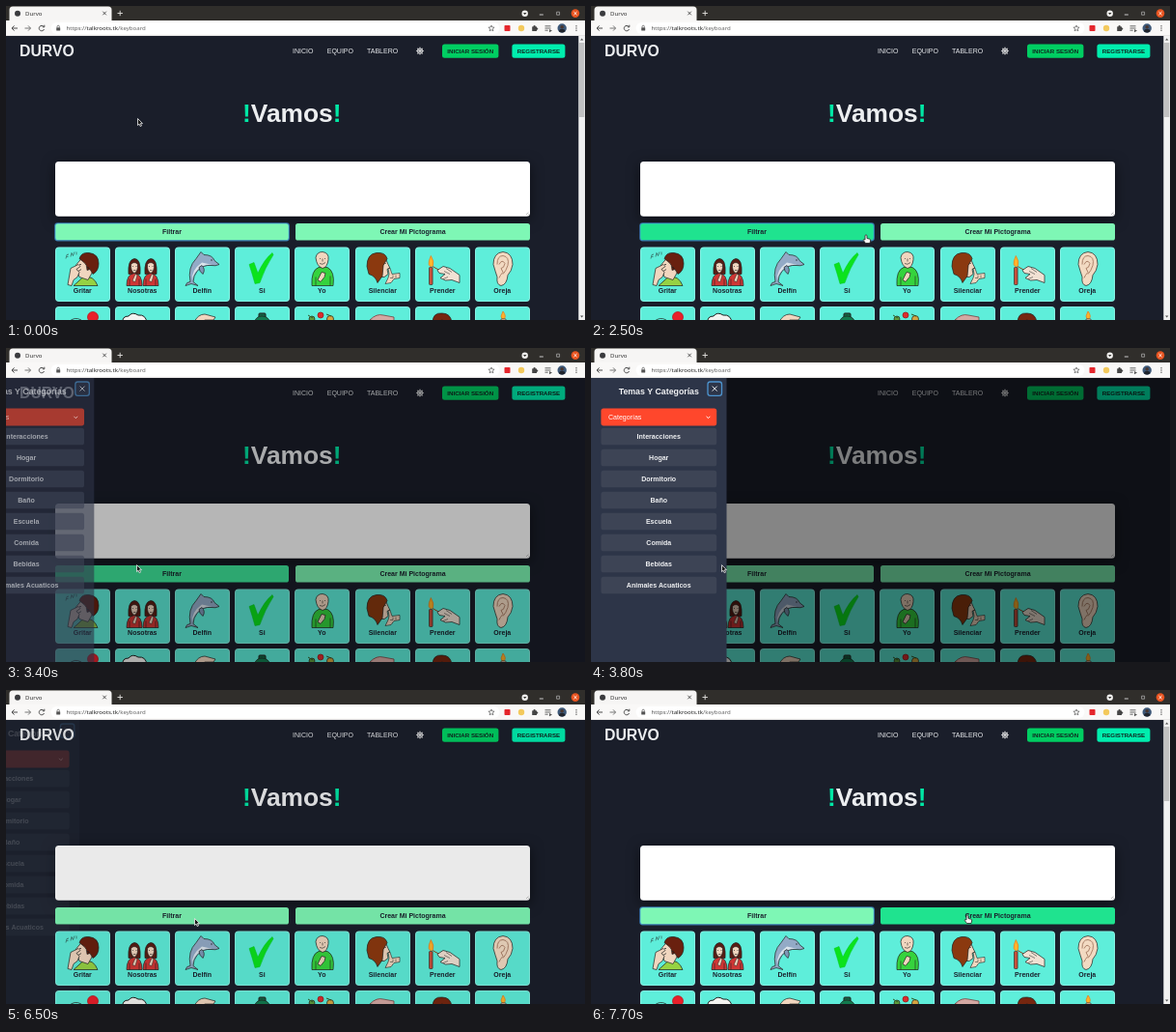
Write an HTML page with a canvas that moves like this. It is 600 px wide and 325 px high and loops after 8000 ms.

```html
<!DOCTYPE html>
<html lang="es">
<head>
<meta charset="utf-8">
<title>Durvo</title>
<style>
html, body { margin: 0; width: 100%; height: 100%; overflow: hidden; background: #1a1e2a; }
canvas { display: block; width: 600px; height: 325px; }
</style>
</head>
<body>
<canvas id="stage"></canvas>
<script>
const canvas = document.getElementById('stage');
const ctx = canvas.getContext('2d');
const W = 600, H = 325, TOP = 31, LOOP = 8000, STEP = 100;
const dpr = window.devicePixelRatio || 1;
canvas.width = W * dpr;
canvas.height = H * dpr;

const BRAND = 'Durvo';
const SANS = '"Liberation Sans", Arial, sans-serif', UI = '"Noto Sans", sans-serif';
const SKIN = '#f1d6bf', PALE = '#f1e1d3', INK = '#20201f', PAGE = '#1a1e2a';
const GREENS = [[126, 247, 181], [31, 227, 143], [5, 202, 124]];
const CARDS = ['Gritar', 'Nosotras', 'Delfín', 'Si', 'Yo', 'Silenciar', 'Prender', 'Oreja'];
const TOPICS = ['Interacciones', 'Hogar', 'Dormitorio', 'Baño', 'Escuela', 'Comida', 'Bebidas', 'Animales Acuaticos'];

// Tracks are [time, value...] keys, read with linear interpolation.
const POINTER = [
  [0, 136.5, 116.5], [1400, 136.5, 116.5], [1500, 138, 128], [1800, 262, 200],
  [2000, 365, 229], [2150, 375, 231], [2300, 341, 221], [2500, 285, 237],
  [2800, 190, 236], [3000, 145, 231], [3200, 135.5, 224.6], [4000, 135.5, 224.6],
  [4200, 141, 232], [4400, 118, 190], [4700, 92, 110], [4900, 84, 72],
  [5000, 82, 69], [5300, 98, 125], [5600, 112, 210], [5800, 148, 230],
  [6100, 195.5, 236.5], [7100, 195.5, 236.5], [7200, 206, 238], [7400, 315, 239], [7600, 390, 233]
];
const FILTER_HEAT = [[2300, 0], [2500, 1], [3100, 1], [3200, 2], [3500, 0], [6600, 0], [6800, 1], [7200, 1], [7400, 0]];
const CREATE_HEAT = [[1900, 0], [2000, 1], [2200, 1], [2300, 0], [7300, 0], [7500, 1]];
const SLIDE = [[3200, 0], [3300, .3], [3400, .65], [3500, .88], [3600, .97], [3700, 1], [6200, 1], [6300, .92], [6500, .54], [6700, .2]];
const FADE = [[3200, 0], [3300, .25], [3400, .6], [3500, .85], [3700, 1], [6200, 1], [6300, .8], [6400, .45], [6500, .17], [6600, 0]];

function track(keys, t) {
  const next = keys.findIndex(k => k[0] > t);
  if (next === 0) return keys[0].slice(1);
  if (next < 0) return keys[keys.length - 1].slice(1);
  const a = keys[next - 1], b = keys[next], u = (t - a[0]) / (b[0] - a[0]);
  return a.slice(1).map((v, i) => v + (b[i + 1] - v) * u);
}

function greenAt(heat) {
  const i = Math.min(1, Math.floor(heat)), u = heat - i;
  return `rgb(${GREENS[i].map((v, k) => Math.round(v + (GREENS[i + 1][k] - v) * u))})`;
}

function box(x, y, w, h, r, fill, stroke, line = 1) {
  ctx.beginPath();
  ctx.roundRect(x, y, w, h, r);
  if (fill) { ctx.fillStyle = fill; ctx.fill(); }
  if (stroke) { ctx.strokeStyle = stroke; ctx.lineWidth = line; ctx.stroke(); }
}

function dot(x, y, r, fill, stroke, line = .7) {
  box(x - r, y - r, 2 * r, 2 * r, r, fill, stroke, line);
}

function shape(d, fill, stroke = INK, line = .7) {
  const path = new Path2D(d);
  if (fill) { ctx.fillStyle = fill; ctx.fill(path); }
  if (stroke) { ctx.strokeStyle = stroke; ctx.lineWidth = line; ctx.stroke(path); }
}

function text(str, x, y, size, color, { bold = false, align = 'left', family = SANS } = {}) {
  ctx.font = `${bold ? 'bold ' : ''}${size}px ${family}`;
  ctx.textAlign = align;
  ctx.fillStyle = color;
  ctx.fillText(str, x, y);
  return ctx.measureText(str).width;
}

function at(x, y, draw) {
  ctx.save();
  ctx.translate(x, y);
  draw();
  ctx.restore();
}

function girl(x) {
  at(x, 0, () => {
    shape('M2 28Q1 13 8 12Q15 12 14 28Z', '#5a1d14');
    shape('M0 40Q0 28 8 27Q16 28 16 40Z', '#d03634');
    shape('M4.5 18Q8 14 11.5 18Q12 25 8 27Q4 25 4.5 18Z', SKIN);
    shape('M6 35L9 28L11 29L9 36Z', SKIN, INK, .5);
    shape('M6 20h1M9.5 20h1M7 24h2.5M3 33v7M13 33v7', null, INK, .6);
  });
}

const PICTOGRAMS = [
  () => {
    shape('M19 40L29 31Q40 29 44 40Z', '#96d243');
    shape('M28 11L22 18L20 22L23 24L25 31L34 34L39 25L38 12Z', SKIN);
    shape('M25 12Q27 5 35 6Q45 7 45 17Q45 25 39 28L36 23L33 24Q33 18 30 16Z', '#69200f');
    shape('M16 22L24 18L26 20L22 23L25 26L23 31L19 34L17 40L13 39Z', SKIN);
    shape('M25 18h2M24 25l3 -2M33 21q2 -1 2 2', null);
    shape('M11 12l1 -4l2 -.5M12 10h1.5M16 10l1 -4l1.5 3l1.5 -4M22 8v-3', null, INK, .5);
  },
  () => { girl(12); girl(29); },
  () => {
    shape('M16 36Q13 21 22 12L27 5L30 8Q39 8 41 14L46 18Q42 20 38 19Q29 18 23 25Q19 30 19 36L24 40L17 38L11 40Q12 36 16 36Z', '#93aac6');
    shape('M39 18.5Q29 17 23 24Q19 28 18 34Q17 24 28 16Z', '#dbe4ec', null);
    shape('M28 19Q32 23 29 28Q25 25 25 21Z', '#7f98b8');
    dot(38, 13.5, .7, INK);
  },
  () => shape('M15 18L20 16L24 27Q31 12 39 6L40 8Q31 22 26 37L21 38Q18 27 15 18Z', '#0be31c', '#00c91b', .5),
  () => {
    shape('M18 40Q17 24 25 21L34 21Q42 25 40 40Z', '#35d33d');
    shape('M22 11Q23 5 29 5Q36 6 35 13Q34 21 29 22Q23 20 22 11Z', SKIN);
    shape('M24 34L28 26L32 27L31 31L27 36Z', SKIN);
    shape('M26 12h1M31 12h1M26 17Q29 19 32 16M29 12v3M22 31v9M37 30v10', null, INK, .6);
  },
  () => {
    shape('M31 11L34 18L36 22L33 23L34 28L30 31L25 31Z', SKIN);
    shape('M12 20Q12 7 22 6Q31 5 33 12L29 19L28 30L23 37Q21 30 14 28Z', '#8b390f');
    shape('M35 28L34 22L36 22L38 28L46 27L46 32L40 33L37 37L31 38L34 32Z', SKIN, INK, .6);
    shape('M30 17h2M36 32h3M39 29v3M42 29v3', null, INK, .5);
  },
  () => {
    box(14.5, 21, 3.6, 18, .8, '#c9503b', INK, .6);
    shape('M16.3 9Q20 15 18.5 19Q16 22 14.2 18Q13.5 15 16.3 9Z', '#ffb32a', '#e8791a');
    shape('M18 20L27 25', null, '#8c4f26', 1);
    shape('M23 24L29 20L36 22L46 29L46 37L38 34Q31 36 26 32L31 28L25 27Z', PALE);
    shape('M30 25L36 28M29 33L34 31M32 22L38 26', null, INK, .5);
  },
  () => {
    shape('M19 18Q19 6 29 5Q39 6 39 18Q38 25 34 29Q33 39 27 40Q22 39 23 31Q21 25 19 18Z', '#f2dac2');
    shape('M23 18Q23 9 29 9Q36 10 34 19Q32 25 29 28M25 18Q28 12 31 17Q30 22 27 22L29 26Q26 29 25 32', null, '#9b6c55', .8);
  }
];

const LOWER_ROW = [
  () => { dot(39, 11, 5.5, '#e8202a', '#b3121a'); shape('M14 16Q20 10 27 14', null, INK, .7); },
  () => shape('M8 17Q7 10 14 10Q18 5 24 9Q32 8 33 17Z', '#f3f3f0', INK, 1),
  () => shape('M20 16Q24 8 31 8L42 11L40 14L31 14L27 17Z', SKIN),
  () => { box(25, 7, 7, 5, 1, '#146444', INK); shape('M20 17Q22 10 28 10Q35 10 37 17Z', '#127a4e'); },
  () => {
    dot(27, 9, 3, '#dd2c2c', '#8f1717');
    dot(18, 13, 3, '#5f9d3d', INK);
    dot(37, 13, 3.5, '#d6a541', INK);
    shape('M14 9l5 3M22 15h9M33 8l5 2', null, '#305b28', 1);
  },
  () => shape('M15 14Q22 7 29 9L40 11L40 15L27 16Z', '#d4a9a3', '#6e3333'),
  () => { shape('M18 17Q18 6 28 7Q37 7 38 17Z', '#76260f'); shape('M24 17Q27 11 33 17Z', SKIN); },
  () => { shape('M29 5Q33 10 30 13Q27 13 27 10Z', '#ffb32a', '#e8791a'); box(27, 13, 5, 6, 0, '#f4d9bf', INK, .6); }
];

function drawCards() {
  CARDS.forEach((name, i) => {
    const x = Math.round(51 + i * 62.1);
    [249.5, 311].forEach((y, row) => at(x, y, () => {
      box(0, 0, 57, 56.5, 4, '#8ff5e7');
      box(.8, .8, 55.4, 54.9, 3.4, '#5eeeda');
      (row ? LOWER_ROW : PICTOGRAMS)[i]();
      if (!row) text(name, 28.3, 47.5, 7.03, '#1a202c', { bold: true, align: 'center' });
    }));
  });
}

function drawGear(x, y) {
  at(x, y, () => {
    for (let i = 0; i < 8; i++) {
      ctx.rotate(Math.PI / 4);
      box(-.35, -4, .7, 4, 0, '#eee');
    }
    dot(0, 0, 2.7, null, '#eee', .8);
  });
}

function drawHeader() {
  text(BRAND.toUpperCase(), 14, 52, 15.8, '#ebedf0', { bold: true });
  [['INICIO', 297], ['EQUIPO', 332.7], ['TABLERO', 374]].forEach(([label, x]) => text(label, x, 48.8, 7.03, '#e6e8eb'));
  drawGear(429, 46.6);
  box(452, 39.4, 58.4, 14.4, 2.5, '#00ce62');
  box(524.4, 39.4, 55, 14.4, 2.5, '#00eeae');
  text('INICIAR SESIÓN', 481.2, 48.8, 6.15, '#10251f', { bold: true, align: 'center' });
  text('REGISTRARSE', 552, 48.8, 6.15, '#10251f', { bold: true, align: 'center' });
}

function drawTitle() {
  const opt = { bold: true };
  let x = 245;
  [['!', '#00e7a5'], ['Vamos', '#eceef0'], ['!', '#00e7a5']].forEach(([s, c]) => { x += text(s, x, 120, 26.35, c, opt); });
}

function drawPage(t, locked) {
  ctx.fillStyle = PAGE;
  ctx.fillRect(0, TOP, W, H - TOP);
  drawHeader();
  drawTitle();
  ctx.save();
  ctx.shadowColor = 'rgba(0,0,0,.5)';
  ctx.shadowBlur = 14 * dpr;
  ctx.shadowOffsetY = 3 * dpr;
  box(51, 161, 492, 56.7, 3.5, '#fff');
  ctx.restore();
  shape('M539 216l2.5 -2.5M541 216l.8 -.8', null, '#888', .5);

  box(51, 225, 242, 17.6, 2.6, greenAt(track(FILTER_HEAT, t)[0]));
  if (!locked) box(50.8, 224.8, 242.5, 18, 2.8, null, 'rgba(66,153,225,.7)', 1.3);
  box(300, 225, 243, 17.6, 2.6, greenAt(track(CREATE_HEAT, t)[0]));
  text('Filtrar', 172, 236.3, 7.03, '#1a202c', { bold: true, align: 'center' });
  text('Crear Mi Pictograma', 421.5, 236.3, 7.03, '#1a202c', { bold: true, align: 'center' });
  drawCards();

  if (!locked) {
    box(593.3, TOP, 6.7, H - TOP, 0, '#f1f1f1');
    box(594, 38, 5.3, 77, 0, '#c1c1c1');
    shape('M595 35.5l1.7 -2l1.7 2zM595 320.5l1.7 2l1.7 -2z', '#555', null);
  }
}

function drawDrawer(slide, fade, [px, py]) {
  ctx.fillStyle = `rgba(0,0,0,${.48 * fade})`;
  ctx.fillRect(0, TOP, W, H - TOP);
  ctx.save();
  ctx.globalAlpha = fade;
  // A nearly faded panel no longer dims the bright content above it.
  if (fade < .3) ctx.globalCompositeOperation = 'lighten';
  ctx.translate((slide - 1) * 140.5, 0);
  box(0, TOP, 140.5, H - TOP, 0, '#2d3548');
  text('Temas Y Categorías', 28.7, 48.2, 8.78, '#f0f1f3', { bold: true });
  box(121, 35, 14.5, 14.3, 2.6, '#2d3548', '#4d94cf', 1.3);
  shape('M125.7 39.6l5 5M130.7 39.6l-5 5', null, '#eceef0', 1);
  box(10.4, 62.6, 119.8, 17.8, 2.6, '#ff472c');
  text('Categorías', 18, 74, 7.03, '#fff');
  shape('M119.6 70.8l1.9 1.9l1.9 -1.9', null, '#fff', 1);
  TOPICS.forEach((topic, i) => {
    const y = 82.8 + i * 22;
    const over = px > 10 && px < 130 && py > y && py < y + 17.5;
    box(10.4, y, 119.8, 17.5, 2.6, over ? '#444b5d' : '#3d4455');
    text(topic, 70.2, y + 11.2, 7.03, '#eff0f2', { bold: true, align: 'center' });
  });
  ctx.restore();
}

function drawBrowser() {
  box(0, 0, W, 16, 0, '#302e2b');
  box(3.5, .5, 106, 16, [3.5, 3.5, 0, 0], '#f6f5f4');
  dot(12, 7.8, 3, '#3a3b3e');
  text(BRAND, 20, 10, 6.1, '#333', { family: UI });
  shape('M100.3 5.7l3.6 3.6M103.9 5.7l-3.6 3.6', null, '#444', .9);
  shape('M115.5 7.5h5.4M118.2 4.8v5.4', null, '#e4e2df', .9);
  dot(537.7, 7.7, 3.2, '#f0efed');
  shape('M536 7h3.4l-1.7 2z', '#302e2b', null);
  shape('M552.8 9h4', null, '#ddd', .9);
  box(570.6, 6.2, 3, 3, 0, null, '#bbb', .7);
  dot(590, 7.6, 4.3, '#e95420');
  shape('M588.4 6l3.2 3.2M591.6 6l-3.2 3.2', null, '#fff', .9);

  box(0, 15, W, 16, 0, '#f9f8f7');
  box(46.5, 17, 465, 12, 6, '#fff');
  box(0, 30.4, W, .6, 0, '#d5d4d3');
  shape('M12 23H6M8.5 20.4L6 23L8.5 25.6', null, '#4c4c4c', 1);
  shape('M19.5 23h6M23 20.4l2.5 2.6l-2.5 2.6', null, '#777', 1);
  shape('M39.5 24a2.7 2.7 0 1 1 -.4 -2.6M39.8 19.7v2.1h-2', null, '#4c4c4c', 1);
  box(52.2, 22.2, 4, 3.4, .5, '#555');
  shape('M53 22.2v-.8a1.2 1.2 0 0 1 2.4 0v.8', null, '#555', .7);
  let x = 62.5;
  [['https://', '#555'], ['talkroots.tk', '#1f1f1f'], ['/keyboard', '#666']].forEach(([s, c]) => { x += text(s, x, 25.2, 6.1, c, { family: UI }); });
  shape('M503 20l.9 2l2.2 .2l-1.7 1.5l.5 2.1l-1.9 -1.1l-1.9 1.1l.5 -2.1l-1.7 -1.5l2.2 -.2z', null, '#555', .7);
  box(516.5, 20, 6, 6, .8, '#e5262c');
  dot(534, 23, 3.2, '#f3c95c');
  box(545.2, 21.2, 4.8, 4.8, .6, '#444');
  dot(547.6, 21, 1.1, '#444');
  dot(550.2, 23.6, 1.1, '#444');
  shape('M558.5 20.8h6M558.5 23h6M558.5 25.2h3.2', null, '#555', .9);
  shape('M563 24l3 1.6l-3 1.6z', '#555', null);
  dot(576.2, 23, 4.7, '#3d5878');
  dot(576.2, 21.8, 1.8, '#4a3730');
  shape('M572.8 26a3.5 3 0 0 1 6.8 0a4.5 4.5 0 0 1 -6.8 0z', '#20242c', null);
  [20.7, 23, 25.3].forEach(y => dot(591, y, .7, '#555'));
}

function drawPointer([x, y], open) {
  const onButton = !open && y > 225 && y < 242.5 && ((x > 51 && x < 293.3) || (x > 300 && x < 543));
  at(x, y, () => {
    if (onButton) shape('M-1 .5Q0 -1 1 .5V3.5L4 4.2Q5 4.5 4.6 6L4 8.5H-.5L-3 5.2Q-2.5 4 -1 5Z', '#f6f6f6', '#222', .8);
    else shape('M0 0V7L1.6 5.6L2.7 8.1L4 7.5L2.9 5.1H5Z', '#161616', '#eee', .8);
  });
}

function render(now) {
  const t = Math.floor((now % LOOP) / STEP) * STEP;
  const pointer = track(POINTER, t);
  const [fade] = track(FADE, t);
  ctx.setTransform(dpr, 0, 0, dpr, 0, 0);
  ctx.lineJoin = 'round';
  drawPage(t, t >= 3300 && t < 6700);
  if (fade > 0) drawDrawer(track(SLIDE, t)[0], fade, pointer);
  drawBrowser();
  drawPointer(pointer, fade > 0);
}

const start = performance.now();
function tick() {
  render(performance.now() - start);
  requestAnimationFrame(tick);
}
tick();
</script>
</body>
</html>
```
